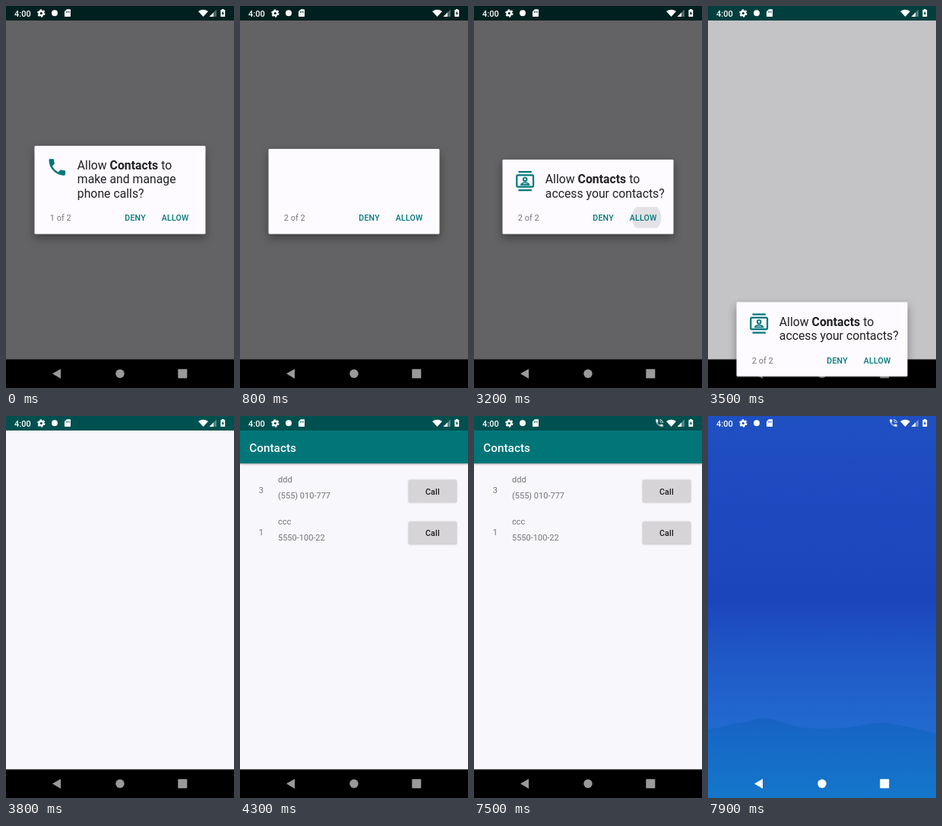
An HTML page for the animation above (8000 ms loop, 300 by 500 pixels).

```html
<!DOCTYPE html>
<html lang="en">
<head>
<meta charset="utf-8">
<title>Contacts permissions</title>
<style>
html, body { margin: 0; width: 100%; height: 100%; overflow: hidden; background: #000; }
svg { display: block; width: 300px; height: 500px; font: 11px Roboto, sans-serif; }

/* Every track shares one 8 s clock; 1.25% is one 100 ms tick. */
.anim { animation: 8s step-end infinite; }
.medium { font-weight: 500; }
.button { font-size: 10.6px; font-weight: 500; letter-spacing: .2px; }
.ask { font-size: 15.8px; fill: #212022; }
.ask tspan { font-weight: 700; }
.teal { fill: #00777b; }
.grey { fill: #757376; }
.card { fill: #fdfbff; x: 37.5px; width: 225px; filter: drop-shadow(0 5px 6px rgba(0,0,0,.36)); animation-name: card; }
.first { animation-name: first; }
.second { animation-name: second; }
.count1 { animation-name: count1; }
.count2 { animation-name: count2; }
.allow { fill: #e4e2e5; animation-name: allow; }
.dialog { animation-name: dialog; }
.dim { animation-name: dim; }
.app { animation-name: app; }
.press { animation-name: press; }
.ripple { animation-name: ripple; }
.incall { animation-name: incall; }
.home { animation-name: home; }
.nav { animation-name: nav; }

@keyframes first { 0% { opacity: 1 } 7.5% { opacity: .8 } 8.75% { opacity: .4 } 10%, 100% { opacity: 0 } }
@keyframes second { 0% { opacity: 0 } 15% { opacity: .15 } 16.25% { opacity: .45 } 17.5% { opacity: .8 } 18.75%, 100% { opacity: 1 } }
@keyframes count1 { 0% { opacity: 1 } 7.5%, 100% { opacity: 0 } }
@keyframes count2 { 0% { opacity: 0 } 7.5%, 100% { opacity: 1 } }
@keyframes card {
  0% { y: 183px; height: 115.5px }
  10% { y: 187px; height: 111.5px }
  11.25% { y: 196px; height: 102.5px }
  12.5%, 100% { y: 201px; height: 97.5px }
}
@keyframes allow {
  0% { r: 0; opacity: 0 }
  6.25% { r: 19.5px; opacity: 1 }
  7.5% { r: 28px; opacity: 1 }
  8.75% { r: 32px; opacity: .5 }
  10% { r: 0; opacity: 0 }
  40% { r: 19.5px; opacity: 1 }
  41.25% { r: 28px; opacity: 1 }
  42.5% { r: 32px; opacity: .5 }
  43.75%, 100% { r: 0; opacity: 0 }
}
@keyframes dialog {
  0% { transform: none; visibility: visible }
  42.5% { transform: translateY(46px); visibility: visible }
  43.75% { transform: translateY(186.5px); visibility: visible }
  45%, 100% { transform: none; visibility: hidden }
}
@keyframes dim { 0% { opacity: .6 } 42.5% { opacity: .4 } 43.75% { opacity: .21 } 45%, 100% { opacity: 0 } }
@keyframes app { 0% { opacity: 0 } 52.5% { opacity: .6 } 53.75%, 100% { opacity: 1 } }
@keyframes press { 0% { opacity: 0 } 87.5% { opacity: 1 } 91.25%, 100% { opacity: 0 } }
@keyframes ripple { 0% { r: 22px } 88.75%, 100% { r: 46px } }
@keyframes incall { 0% { opacity: 0 } 93.75%, 100% { opacity: 1 } }
@keyframes home { 0% { opacity: 0 } 96.25% { opacity: .35 } 97.5% { opacity: .75 } 98.75%, 100% { opacity: 1 } }
@keyframes nav { 0% { fill: #999a99 } 96.25% { fill: #bdbebd } 97.5% { fill: #e6e6e6 } 98.75%, 100% { fill: #fff } }
</style>
</head>
<body>
<svg viewBox="0 0 300 500">
  <defs>
    <path id="phone" d="M6.62 10.79c1.44 2.83 3.76 5.14 6.59 6.59l2.2-2.2c.27-.27.67-.36 1.02-.24 1.12.37 2.33.57 3.57.57.55 0 1 .45 1 1V20c0 .55-.45 1-1 1-9.39 0-17-7.61-17-17 0-.55.45-1 1-1h3.5c.55 0 1 .45 1 1 0 1.25.2 2.45.57 3.57.11.35.03.74-.25 1.02l-2.2 2.2z"/>
    <rect id="key" x="222" y="84" width="63" height="29" rx="1.5"/>
    <clipPath id="keyClip"><use href="#key"/></clipPath>
    <clipPath id="allowClip"><rect x="199" y="263" width="47.5" height="27.5" rx="1.5"/></clipPath>
    <linearGradient id="sky" x2="0" y2="1">
      <stop offset="0" stop-color="#1f50c2"/>
      <stop offset=".25" stop-color="#1d49bf"/>
      <stop offset=".48" stop-color="#1b45bb"/>
      <stop offset=".56" stop-color="#1d50c2"/>
      <stop offset=".68" stop-color="#205dc9"/>
      <stop offset=".8" stop-color="#2168cf"/>
    </linearGradient>
    <linearGradient id="land" x2="0" y2="1">
      <stop offset="0" stop-color="#1762c4"/>
      <stop offset=".25" stop-color="#1668c7"/>
      <stop offset="1" stop-color="#1477ca"/>
    </linearGradient>
  </defs>

  <rect width="300" height="500" fill="#f8f7fb"/>
  <rect width="300" height="19" fill="#00504f"/>

  <g class="anim app">
    <rect y="19" width="300" height="43" fill="#007679" style="filter:drop-shadow(0 1px 1.2px rgba(0,0,0,.4))"/>
    <rect width="300" height="19" fill="#00504f"/>
    <text class="medium" x="12.3" y="46.7" font-size="15.3" fill="#fff">Contacts</text>
    <g class="grey">
      <text x="24.8" y="100.8">3</text>
      <text x="50" y="87">ddd</text>
      <text x="50" y="107.8">(555) 010-777</text>
      <text x="24.8" y="155.5">1</text>
      <text x="50" y="141.7">ccc</text>
      <text x="50" y="162.5">5550-100-22</text>
    </g>
    <g fill="#d6d4d7" style="filter:drop-shadow(0 .8px .8px rgba(0,0,0,.32))">
      <use href="#key"/>
      <use href="#key" y="54.7"/>
    </g>
    <g class="anim press" clip-path="url(#keyClip)">
      <use href="#key" fill-opacity=".04"/>
      <circle class="anim ripple" cx="246" cy="94" r="22" fill-opacity=".06"/>
    </g>
    <g class="button" text-anchor="middle" fill="#1c1b1d">
      <text x="253.4" y="102.5">Call</text>
      <text x="253.4" y="157.2">Call</text>
    </g>
  </g>

  <rect class="anim dim" width="300" height="463"/>
  <rect y="462.5" width="300" height="37.5"/>

  <g class="anim home">
    <rect width="300" height="500" fill="url(#sky)"/>
    <path fill="url(#land)" d="M0 410Q20 407 35 402Q52 401 66 396Q76 393 88 398Q108 404 125 408Q145 410 165 409Q190 408 208 404Q230 399 248 404Q275 408 300 416V500H0z"/>
  </g>

  <g class="anim nav">
    <path d="M61 481.3L72 475V487.8z"/>
    <circle cx="150" cy="481.3" r="5.7"/>
    <rect x="226.3" y="475.3" width="12" height="12" rx="1"/>
  </g>

  <g fill="#fff">
    <text class="medium" x="11" y="13.5">4:00</text>
    <circle cx="46.3" cy="9.5" r="2.8" fill="none" stroke="#fff" stroke-width="2.4"/>
    <circle cx="46.3" cy="9.5" r="4.5" fill="none" stroke="#fff" stroke-width="1.4" stroke-dasharray="2.4 2.312"/>
    <circle cx="64" cy="9.3" r="4"/>
    <path fill-rule="evenodd" d="M80 4.3h4.2q.8 0 .8.8v8.2q0 .8-.8.8h-6.4q-.8 0-.8-.8V7.2zM79 6.8v2h.9v-2zM80.9 6.8v2h.9v-2zM82.8 6.8v2h.9v-2z"/>
    <use class="anim incall" href="#phone" transform="translate(237.6 2.8) scale(.53)"/>
    <g class="anim incall" fill="none" stroke="#fff" stroke-width="1">
      <path d="M244.3 4.8a4.2 4.2 0 0 1 4.2 4.2M244.3 6.9a2.1 2.1 0 0 1 2.1 2.1"/>
    </g>
    <path d="M253 7Q259.5 2.4 266 7L259.5 14z"/>
    <path d="M277 4.5V14H267.5z" fill-opacity=".32"/>
    <path d="M273 8.5V14H267.5z"/>
    <path fill-rule="evenodd" d="M284 4h2.6v1h1.6v9h-5.8V5H284zM285.8 6.5l-2.2 3.6h1.3v2.6l2.1-3.6h-1.2z"/>
  </g>

  <g class="anim dialog">
    <rect class="anim card" rx="1.5"/>
    <g class="anim first">
      <use href="#phone" class="teal" transform="translate(53 196.7) scale(1.19)"/>
      <text class="ask" x="93.8" y="213.8">Allow <tspan>Contacts</tspan> to</text>
      <text class="ask" x="93.8" y="232.3">make and manage</text>
      <text class="ask" x="93.8" y="250.8">phone calls?</text>
    </g>
    <g class="anim second">
      <g transform="translate(54.1 216) scale(1.09)" fill="none" stroke="#00777b" stroke-width="2">
        <path d="M4 1H20M4 23H20"/>
        <rect x="2" y="5" width="20" height="14" rx="1.5"/>
        <circle cx="12" cy="10" r="2.1" stroke-width="1.8"/>
        <path d="M7.2 16.4c.6-1.8 3-2.4 4.8-2.4s4.2.6 4.8 2.4z" stroke-width="1.5"/>
      </g>
      <text class="ask" x="93.8" y="232.3">Allow <tspan>Contacts</tspan> to</text>
      <text class="ask" x="93.8" y="250.8">access your contacts?</text>
    </g>
    <text class="anim grey count1" x="57.8" y="281">1 of 2</text>
    <text class="anim grey count2" x="57.8" y="281">2 of 2</text>
    <g clip-path="url(#allowClip)"><circle class="anim allow" cx="227" cy="277"/></g>
    <g class="button teal">
      <text x="156.3" y="281">DENY</text>
      <text x="204.8" y="281">ALLOW</text>
    </g>
  </g>
</svg>
</body>
</html>
```
